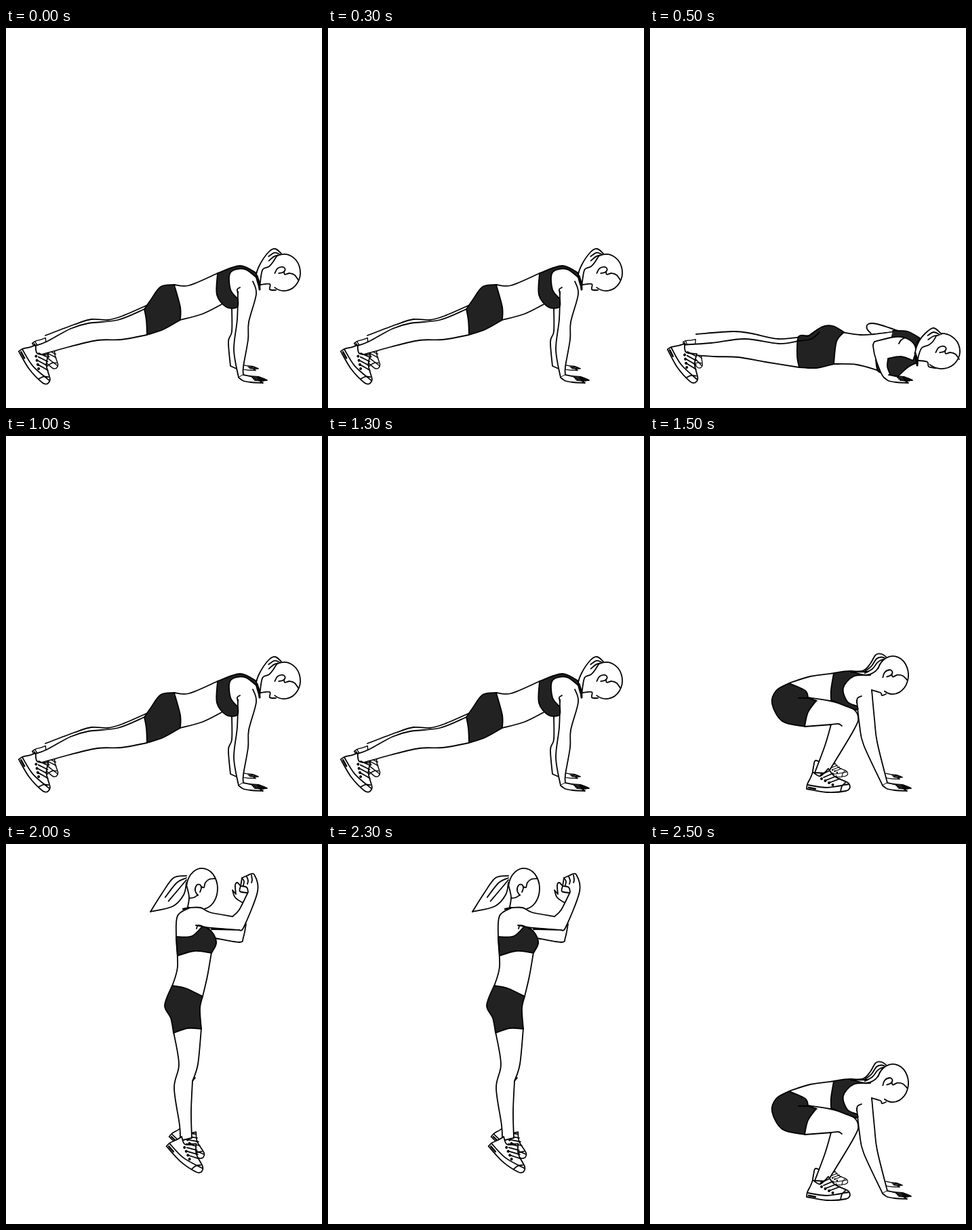
Recreate the animation shown at these times as an HTML page with a canvas. Size 466 px wide and 561 px high, loop 3 s.

```html
<!DOCTYPE html>
<html lang="en">
<head>
<meta charset="utf-8">
<title>Burpee exercise</title>
<style>
  html, body { margin: 0; width: 100%; height: 100%; overflow: hidden; background: #fff; }
  canvas { display: block; width: 466px; height: 561px; }
</style>
</head>
<body>
<canvas id="stage"></canvas>
<script>
const WIDTH = 466, HEIGHT = 561, HOLD = 500, PEN = 1.8;
const CLOTH = '#222', SKIN = '#fff', INK = '#000';
const canvas = document.getElementById('stage');
const ctx = canvas.getContext('2d');
const ratio = window.devicePixelRatio || 1;
canvas.width = WIDTH * ratio;
canvas.height = HEIGHT * ratio;

const points = text => text.trim().split(/\s+/).map(p => p.split(',').map(Number));
const mix = (a, b, t) => a.map((v, i) => v + (b[i] - v) * t);

// Smooth curve through key points.
function curve(path, pts) {
  for (let i = 0; i < pts.length - 1; i++) {
    const b = pts[i], c = pts[i + 1], a = pts[i - 1] || b, d = pts[i + 2] || c;
    path.bezierCurveTo(
      b[0] + (c[0] - a[0]) / 6, b[1] + (c[1] - a[1]) / 6,
      c[0] - (d[0] - b[0]) / 6, c[1] - (d[1] - b[1]) / 6, c[0], c[1]);
  }
}

// "/" marks a sharp corner at the point before it.
function trace(text) {
  const path = new Path2D();
  let last = null;
  for (const part of text.split('/')) {
    const pts = points(part);
    if (last) pts.unshift(last);
    else path.moveTo(...pts[0]);
    curve(path, pts);
    last = pts[pts.length - 1];
  }
  return path;
}

function line(text, width = PEN) {
  ctx.lineWidth = width;
  ctx.stroke(trace(text));
}

function shape(text, fill = SKIN) {
  ctx.fillStyle = fill;
  ctx.fill(trace(text));
  line(text);
}

const cloth = text => shape(text, CLOTH);

function place(x, y, degrees, scale, draw) {
  ctx.save();
  ctx.translate(x, y);
  ctx.rotate(degrees * Math.PI / 180);
  ctx.scale(scale, scale);
  draw();
  ctx.restore();
}

// Placed by the heel, toe pointing right when not turned.
function shoe(x, y, degrees, scale = 1) {
  place(x, y, degrees, scale, () => {
    shape('0,-1 1,-8 6,-18 9,-26 / 20,-20 32,-31 / 42,-19 61,-10 64,-3 / 58,2 30,4 0,-1');
    line('1,-7 30,-3 62,-8');
    line('50,3 52,-5 57,-10');
    line('3,-3 13,-1', 2.6);
    ctx.fillStyle = INK;
    for (let i = 0; i < 4; i++) {
      line(`${21 + 4 * i},${-22 + 4 * i} ${34 + 5 * i},${-28 + 4 * i}`);
      ctx.beginPath();
      ctx.arc(22 + 5.5 * i, -16 + 3 * i, 2, 0, 7);
      ctx.fill();
    }
  });
}

// Placed by the heel of the palm, fingers pointing right.
function hand(x, y, scale = 1) {
  place(x, y, 0, scale, () => {
    shape('7,-4 17,-2 29,-1 42,4 / 32,5 36,8 / 18,7 7,5 0,0');
    for (let i = 0; i < 3; i++) line(`${20 + 2 * i},${i * 2} ${30 + i},${1 + i * 2} ${40 - 3 * i},${4 + i}`);
  });
}

// The outline is an arc left open at the neck.
function head(x, y, rx, ry, from, to) {
  const rad = Math.PI / 180;
  ctx.beginPath();
  ctx.ellipse(x, y, rx, ry, 0, from * rad, to * rad);
  ctx.fillStyle = SKIN;
  ctx.fill();
  ctx.lineWidth = PEN;
  ctx.stroke();
}

function hairline(x, y, degrees) {
  place(x, y, degrees, 1, () => {
    line('0,10 -4,3 -2,-5 3,-6 5,-1 3,5');
    line('5,-3 9,-2 11,-9 17,-14 26,-15');
  });
}

// Strands are spread evenly between the two edges, from the given key point on.
function ponytail(outer, inner, first, last) {
  const a = points(outer), b = points(inner);
  const path = new Path2D();
  path.moveTo(...a[0]);
  curve(path, a);
  path.lineTo(...b[b.length - 1]);
  curve(path, [...b].reverse());
  ctx.fillStyle = SKIN;
  ctx.fill(path);
  for (const t of [0, 0.3, 0.6, 1]) {
    const edge = t === 0 || t === 1;
    const strand = a.map((p, i) => mix(p, b[i], t)).slice(edge ? 0 : first, edge ? undefined : last);
    const hair = new Path2D();
    hair.moveTo(...strand[0]);
    curve(hair, strand);
    ctx.lineWidth = PEN;
    ctx.stroke(hair);
  }
}

function plank() {
  shoe(38, 466, 48, 0.8);
  line('211,408 172,425 150,431 126,430 100,438 58,454');
  shape('204,415 165,431 121,436 95,444 60,463 41,470 / 46,484 / 92,471 135,461 170,460 208,453');
  shoe(18, 478, 50);

  line('248,379 270,380 312,362');
  line('257,431 290,422 318,408');
  cloth('248,379 228,382 213,402 204,415 / 207,432 208,453 / 232,445 257,431 / 257,412 248,379');

  shape('333,413 333,448 328,463 331,499 / 340,503 / 344,450 342,410');
  hand(343, 500, 0.7);
  shape('342,389 341,430 336,475 343,516 / 350,512 / 350,500 357,460 358,434 369,393 364,374');
  hand(343, 516);
  cloth('312,362 345,351 368,361 / 371,370 / 352,356 331,361 331,386 342,400 / 341,412 325,412 311,394 312,362');
  line('342,392 341,386 345,383');

  head(410, 361, 24, 27, 215, 485);
  line('375,379 389,378 389,386 398,387');
  ponytail('374,385 369,366 374,350 387,331 397,326 406,333', '374,385 376,367 379,356 388,352 394,345 399,337', 3);
  line('370,366 373,376 374,386', 3);
  hairline(405, 357, 60);
}

function low() {
  shoe(48, 464, 58, 0.72);
  line('235,454 190,459 150,451 123,448 68,452');
  shape('219,462 190,466 140,459 90,465 45,468 / 50,482 / 95,485 130,486 170,493 220,501');
  shoe(25, 475, 52);

  line('282,449 310,453 330,452 360,448');
  line('271,496 305,497 338,506');
  cloth('233,455 254,441 270,440 286,449 / 275,463 271,496 / 245,502 220,501 / 217,484 219,456 233,455');
  line('219,462 238,459 250,449');

  shape('326,451 320,444 322,437 335,437 366,447');
  cloth('358,447 380,448 398,458 / 392,470 394,494 / 380,501 365,515 / 347,511 336,506 333,490 / 352,470');
  shape('388,491 370,485 351,488 / 350,500 354,511 / 345,516 334,492 329,470 331,463 / 362,456 382,460 392,473 388,491');
  line('376,457 370,461 367,466');
  hand(345, 516);

  head(430, 477, 27, 26, 215, 490);
  line('396,491 409,493 411,500 421,502');
  ponytail('394,498 391,480 397,462 409,448 419,443 430,452', '394,498 396,484 401,472 411,468 417,463 422,455', 3);
  line('391,480 394,490 394,498', 3);
  hairline(430, 474, 60);
}

function squat() {
  shoe(252, 501, 0, 0.62);
  shape('232,386 265,391 295,400 307,414 300,435 262,498 / 243,497 / 258,457 267,426 / 228,429');
  line('267,426 278,425 283,428');
  line('240,495 243,480 248,480');
  shoe(231, 522, 0);

  line('205,365 236,355 273,350');
  cloth('205,365 186,376 180,395 195,421 228,429 / 233,408 245,391 / 233,387 / 229,376 205,365');
  line('219,387 232,387 246,391');

  hand(343, 501, 0.7);
  shape('305,391 309,427 315,456 343,516 / 350,512 / 335,452 331,418 327,375');
  hand(343, 516);
  cloth('271,350 297,347 325,353 / 300,355 285,372 291,392 306,399 / 303,404 267,390 / 267,374 271,350');
  line('305,394 306,387 312,384');

  head(358, 353, 23, 28, 200, 482);
  line('327,375 340,379 342,383 348,381');
  ponytail('296,348 315,346 325,336 333,323 342,322 349,327', '296,348 318,353 330,349 336,343 339,337 343,331', 1);
  line('296,348 321,348', 2.4);
  hairline(351, 350, 50);
}

function jump() {
  shoe(240, 433, 33, 0.92);
  shape('247,277 255,325 248,360 256,415 257,438 / 274,434 / 273,395 275,350 / 283,325 288,272');
  line('275,350 279,345');
  shoe(236, 447, 38);

  shape('303,126 342,126 354,118 / 350,138 344,145 308,139');
  shape('351,88 338,79 334,68 / 339,74 / 338,61 341,57 346,62 / 345,70 356,72');

  shape('271,94 253,106 251,137 253,181 245,210 / 290,225 / 297,195 303,160 / 310,145 297,122');
  cloth('245,209 265,213 290,225 / 286,243 288,273 / 268,272 247,279 / 243,257 234,238 245,209');
  cloth('251,137 274,136 290,121 / 303,129 310,145 303,161 / 278,158 253,165 / 251,137');

  shape('270,94 287,94 301,101 334,107 / 344,97 357,71 / 355,64 346,62 / 348,50 / 357,46 / 366,45 371,70 351,122 344,127 / 304,124 280,120');
  for (let i = 0; i < 3; i++) line(`${348 + 7 * i},${50 - 2 * i} ${351 + 6 * i},${55 - i} ${350 + 6 * i},${61 - 2 * i}`);
  line('281,125 283,120 289,121');

  head(289, 66, 23, 30, 190, 440);
  line('266,60 270,78 268,93');
  line('261,96 270,94', 2.4);
  line('270,80 277,79 283,75');
  ponytail('266,47 247,50 230,73 213,100', '266,57 262,75 246,92 213,100', 0, 3);
  hairline(283, 66, 0);
}

const ROUTINE = [plank, low, plank, squat, jump, squat];
let shown = null;

function render() {
  const pose = ROUTINE[Math.floor(performance.now() / HOLD) % ROUTINE.length];
  if (pose !== shown) {
    shown = pose;
    ctx.setTransform(ratio, 0, 0, ratio, 0, 0);
    ctx.fillStyle = '#fff';
    ctx.fillRect(0, 0, WIDTH, HEIGHT);
    ctx.strokeStyle = INK;
    ctx.lineCap = ctx.lineJoin = 'round';
    pose();
  }
  requestAnimationFrame(render);
}
render();
</script>
</body>
</html>
```
